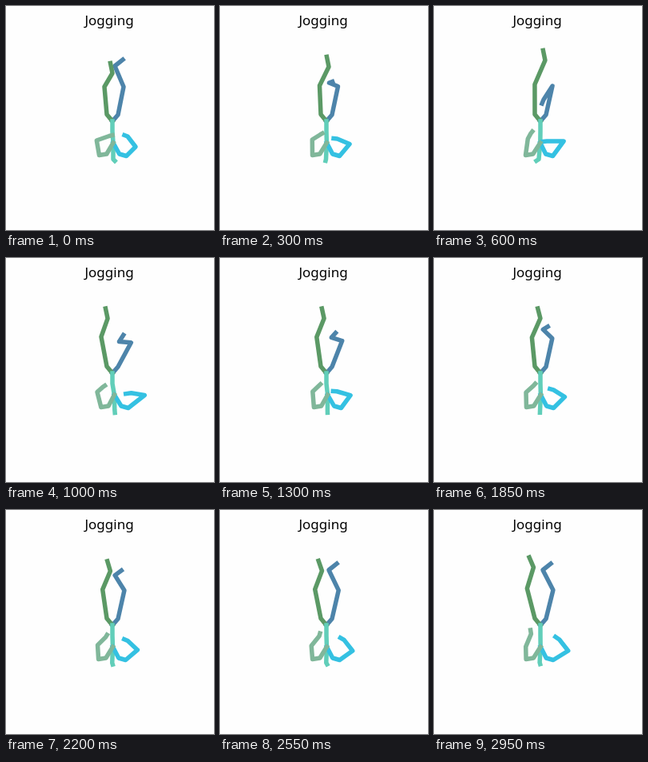
Recreate the animation shown at these times as an HTML page. Size 260 by 280 pixels, loop 3 s.

```html
<!DOCTYPE html>
<html lang="en">
<head>
<meta charset="utf-8">
<title>Jogging</title>
<style>
  html, body { margin: 0; width: 100%; height: 100%; overflow: hidden; background: #fefefe; }
  svg { display: block; width: 260px; height: 280px; }
  polyline { fill: none; stroke-width: 5.5; stroke-linecap: square; stroke-linejoin: round; }
  text { font: 17px "Noto Sans", "DejaVu Sans", sans-serif; text-anchor: middle; }
</style>
</head>
<body>
<svg id="stage" viewBox="0 0 260 280">
  <text x="129" y="24">Jogging</text>
</svg>
<script>
const LOOP = 3000, STEP = 50;

const clamp = x => Math.min(1, Math.max(0, x));
const ease = x => x * x * (3 - 2 * x);
const bump = (time, centre, half) =>
  Math.cos(Math.PI / 2 * Math.min(1, Math.abs(time - centre) / half)) ** 2;

// One leg tucks quickly and unfolds slowly.
const tuckAt = time => time < 600 ? ease(time / 600) : clamp((2500 - time) / 1900);

// Each joint is a rest point moved by a few shared motions.
function pose(time) {
  const tuck = tuckAt(time);
  const swing = bump(time, 1075, 475);
  const reach = bump(time, 1000, 350);
  const drift = (time / LOOP) ** 3;

  const move = (x, y, byTuck = [0, 0], bySwing = [0, 0], byDrift = [0, 0], swinging = swing) =>
    [x, y].map((v, i) => v + tuck * byTuck[i] + swinging * bySwing[i] + drift * byDrift[i]);
  const armMove = (x, y, byTuck, byReach, byDrift) =>
    move(x, y, byTuck, byReach, byDrift, reach);
  const offset = ([x, y], dx, dy) => [x + dx, y + dy];

  const sway = 4.2 * swing - 2 * tuck - 1.5 * drift;
  const root = [133, 144];
  const chest = [134 + sway * 0.6, 171];
  const ankle = move(133, 84, [6, -16], [-11, 5], [-9, -13]);

  return {
    rightLeg: [
      root, [140, 136],
      move(147, 101, [1, -1], [9, 6], [2, -1]),
      move(136, 75, [1, 42], [5, -4]),
      move(146, 67, [-11, 55], [10, -15])
    ],
    leftLeg: [
      root, [126, 135.5],
      move(123, 101, [3, -3], [-6.5, 0], [-7, -3]),
      ankle,
      offset(ankle, -2.5 - 3 * drift, -12.5)
    ],
    spine: [
      root, [133, 157], chest,
      move(134, 191.5, [-3, 0], [4.5, -2], [-2, -1]),
      move(136, 193.5, [-8, 0], [7, 0], [-3.5, -1])
    ],
    rightArm: [
      chest, [141.7 + sway, 185], [150.5 + sway, 187.5],
      armMove(162, 176, [0, -7], [11, 1], [6, 0]),
      armMove(152, 163, [-11, 6], [13, 1], [5, -1]),
      armMove(148, 161.5, [-12, 8], [11, 2], [4, -3])
    ],
    leftArm: [
      chest, [125.8 + sway, 185], [116.5 + sway, 186.5],
      armMove(113.3, 168, [4, -2], [-2.5, 1], [1.5, 3]),
      armMove(129, 162.5, [-8, -3], [-2, 2], [-8, -8]),
      armMove(133, 161.5, [-10, -4.5], [-1, 2], [-13, -12])
    ]
  };
}

const colors = {
  rightLeg: "#4D84AA", leftLeg: "#5B9965", spine: "#61CEB9",
  rightArm: "#34C1E2", leftArm: "#80B79A"
};

const stage = document.getElementById("stage");
const lines = {};
for (const [limb, color] of Object.entries(colors)) {
  lines[limb] = document.createElementNS("http://www.w3.org/2000/svg", "polyline");
  lines[limb].setAttribute("stroke", color);
  stage.append(lines[limb]);
}

function draw(time) {
  for (const [limb, points] of Object.entries(pose(time))) {
    lines[limb].setAttribute("points", points.join(" "));
  }
}

const start = performance.now();
function tick() {
  const elapsed = (performance.now() - start) % LOOP;
  draw(Math.floor(elapsed / STEP) * STEP);
  requestAnimationFrame(tick);
}
tick();
</script>
</body>
</html>
```
